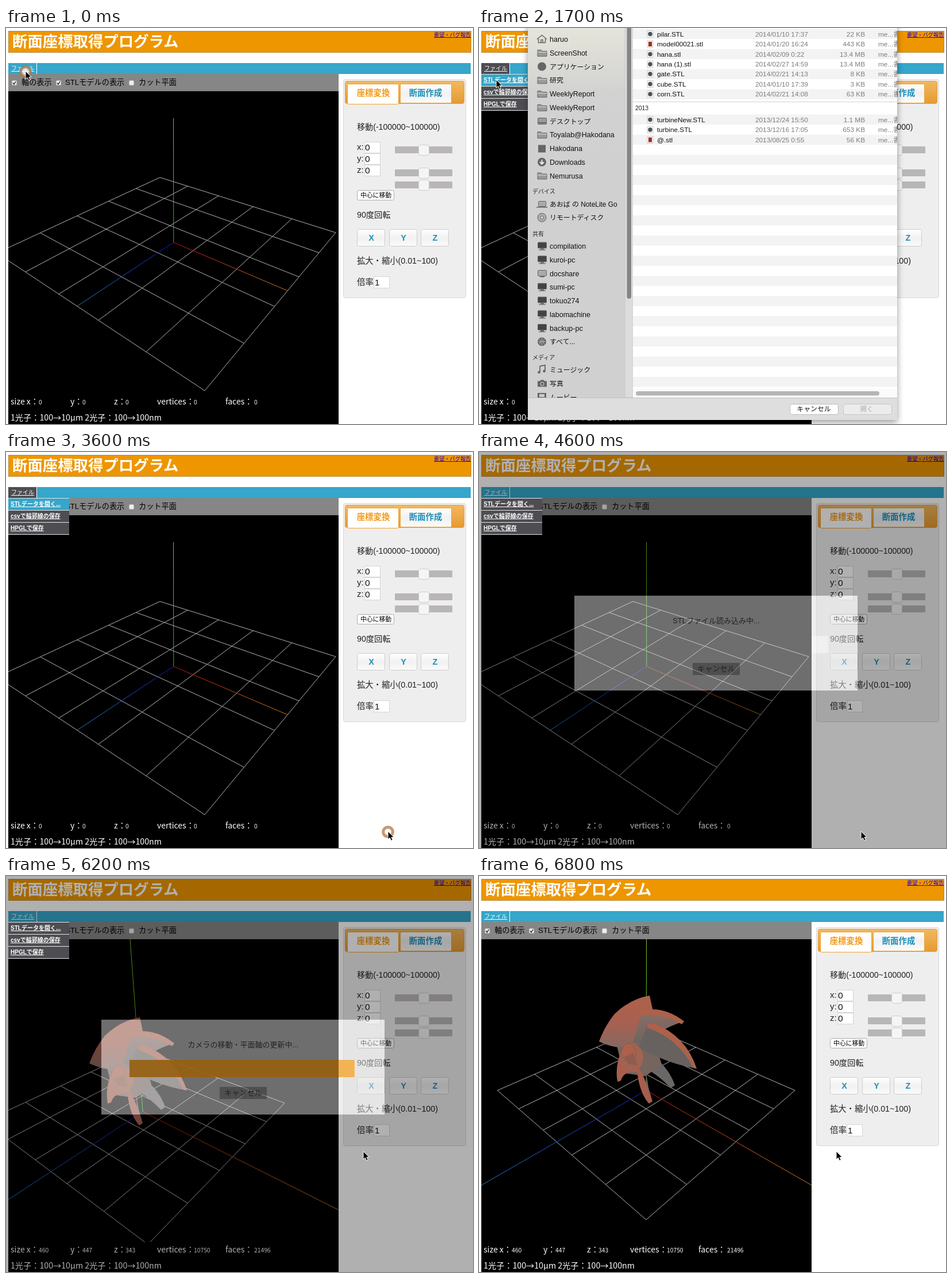
An HTML page that plays this animation: 813 px wide and 689 px high, repeating every 6.9 s.

```html
<!DOCTYPE html>
<html lang="ja">
<head>
<meta charset="utf-8">
<style>
html, body { margin: 0; width: 100%; height: 100%; overflow: hidden; background: #fff; }
svg { display: block; width: 813px; height: 689px; font-family: "Liberation Sans", "Noto Sans CJK JP", sans-serif; }
.wide { font-family: "Noto Sans CJK JP", "Noto Sans CJK", sans-serif; }
</style>
</head>
<body>
<svg id="stage" viewBox="0 0 813 689"></svg>
<script>
const LOOP = 6900;
const stage = document.getElementById('stage');

// Markup helpers
const rect = (x, y, w, h, fill, more = '') => `<rect x="${x}" y="${y}" width="${w}" height="${h}" fill="${fill}" ${more}/>`;
const box = (x, y, w, h, fill, stroke, r = 0) => rect(x + .5, y + .5, w, h, fill, `stroke="${stroke}" rx="${r}"`);
const text = (x, y, s, size, fill, more = '') => `<text x="${x}" y="${y}" font-size="${size}" fill="${fill}" ${more}>${s}</text>`;
const path = (d, fill, more = '') => `<path d="${d}" fill="${fill}" ${more}/>`;
const group = (id, body, more = '') => `<g id="${id}" ${more}>${body}</g>`;
const shade = (id, ...colors) => `<linearGradient id="${id}" x2="0" y2="1">` +
  colors.map((c, i) => `<stop offset="${i / (colors.length - 1)}" stop-color="${c}"/>`).join('') + '</linearGradient>';
const BOLD = ' font-weight="700"', LINK = ' text-decoration="underline"', MID = ' text-anchor="middle"', WIDE = ' class="wide"';

// Maps the unit square onto a quad given as top, right, bottom, left
function perspective([[x0, y0], [x1, y1], [x2, y2], [x3, y3]]) {
  const ax = x1 - x2, ay = y1 - y2, bx = x3 - x2, by = y3 - y2;
  const sx = x0 - x1 + x2 - x3, sy = y0 - y1 + y2 - y3;
  const den = ax * by - bx * ay, g = (sx * by - bx * sy) / den, h = (ax * sy - sx * ay) / den;
  return (u, v) => {
    const w = g * u + h * v + 1;
    return [((x1 - x0 + g * x1) * u + (x3 - x0 + h * x3) * v + x0) / w,
            ((y1 - y0 + g * y1) * u + (y3 - y0 + h * y3) * v + y0) / w];
  };
}

function axis(id, [x1, y1], [x2, y2], from, to) {
  const ends = `x1="${x1}" y1="${y1}" x2="${x2}" y2="${y2}"`;
  return `<linearGradient id="${id}" gradientUnits="userSpaceOnUse" ${ends}><stop stop-color="${from}"/>` +
    `<stop offset="1" stop-color="${to}"/></linearGradient><line ${ends} stroke="url(#${id})"/>`;
}

function scene(id, quad, xEnd, yEnd, zEnd, extra = '') {
  const at = perspective(quad), origin = at(.5, .5);
  let d = '';
  for (let i = 0; i <= 5; i++) d += `M${at(i / 5, 0)}L${at(i / 5, 1)}M${at(0, i / 5)}L${at(1, i / 5)}`;
  return group(id, path(d, 'none', 'stroke="#b2b2b2"') +
    axis(id + 'X', origin, xEnd, '#c01010', '#c07c20') +
    axis(id + 'Y', origin, yEnd, '#18c018', '#80c020') +
    axis(id + 'Z', origin, zEnd, '#1818c0', '#2080c8') + extra, 'clip-path="url(#view)"');
}

const turbine =
  path('M302 314C320 324 336 347 341 364L334 369C321 356 308 344 288 334Z', '#6c6767') +
  path('M264 290L298 250L326 262L310 300L318 328L290 348L252 343L240 296Z', '#76645e') +
  path('M209 288Q219 261 236 240Q263 214 297 208L302 231L292 284L264 297Q238 302 209 288Z', 'url(#blade)') +
  path('M284 234Q325 234 357 253Q319 264 288 291L268 290Z', 'url(#under)') +
  path('M280 235Q320 224 357 253L353 258Q322 239 278 242Z', '#ad614b') +
  path('M293 258Q350 272 379 335Q333 328 278 299Z', '#67625f') +
  path('M293 258L303 256Q360 277 379 335L373 334Q348 283 293 264Z', '#ad614b') +
  path('M249 301Q236 331 241 358L247 356Q252 338 276 341L283 306Z', '#a85f4c') +
  path('M276 330Q287 347 293 366L302 392L296 396Q281 380 276 346Z', '#a65e4d') +
  path('M290 336L295 368L302 392L292 366Z', '#746762') +
  '<ellipse cx="266" cy="316" rx="20" ry="24" fill="#a16352"/>' +
  path('M247 309Q252 287 265 292Q278 303 269 327Q253 323 247 309Z', '#ad614b', 'stroke="#855b52"') +
  path('M253 315L268 307L276 330L260 327Z', '#905c4f');

// Main page
const check = (x, on) => box(x, 91, 8, 8, '#eee', '#bbb', 1.5) +
  (on ? path(`M${x + 2} 95.5l2 2.5 3-5`, 'none', 'stroke="#222" stroke-width="1.4"') : '');
const slider = y => rect(677, y - 6, 100, 12, '#b9b6b7', 'rx="1"') + box(718, y - 9, 18, 18, '#f5f5f5', '#ccc', 3);
const field = (y, label) => text(611, y + 14, label, 15, '#222') + box(624, y, 27, 19, '#fff', '#d4d4d4') +
  text(625, y + 15, '0', 15.5, '#111');
const button = (x, s) => box(x, 350, 48, 29, 'url(#soft)', '#ccc', 3) + text(x + 25, 370, s, 14.4, '#1c8fb8', BOLD + MID);

const header = box(4, 5, 805, 37, '#ee9600', '#b38a45') +
  text(11, 33, '断面座標取得プログラム', 26.4, '#fff', BOLD) +
  text(745, 15, '要望・バグ報告', 9.2, '#2200c8', LINK) +
  rect(4, 61, 805, 19, '#36a6ca') + rect(4, 61, 49, 19, '#4e4d52', 'id="tab"') +
  text(9, 74, 'ファイル', 10, '#fff', LINK) + rect(53, 61, 1, 19, '#fff') +
  rect(4, 80, 575, 30, '#868686') + check(10, 1) + check(87, 1) + check(214, 0) +
  text(27, 99, '軸の表示', 13.2, '#000') + text(103, 99, 'STLモデルの表示', 13.2, '#000') +
  text(231, 99, 'カット平面', 13.2, '#000');

const panel = box(587, 89, 213, 380, '#eee', '#d8d8d8', 3) +
  box(590, 92, 207, 39, 'url(#amber)', '#e3a143', 3) +
  box(594, 97, 89, 35, '#fff', '#f2a02a', 2) + box(686, 97, 89, 33, 'url(#soft)', '#e8a63e', 2) +
  text(639.5, 118, '座標変換', 14.4, '#f09a1c', BOLD + MID) + text(730.5, 118, '断面作成', 14.4, '#1c8fb8', BOLD + MID) +
  text(611, 177, '移動(-100000~100000)', 14.1, '#222') +
  field(198, 'x:') + field(218, 'y:') + field(238, 'z:') + slider(212) + slider(252) + slider(273) +
  box(611, 282, 64, 17, '#fff', '#aaa', 3) + text(617, 295, '中心に移動', 10.8, '#000') +
  text(611, 330, '90度回転', 14.2, '#222') + button(611, 'X') + button(667, 'Y') + button(722, 'Z') +
  text(611, 410, '拡大・縮小(0.01~100)', 14.3, '#222') + text(611, 447, '倍率', 14.4, '#222') +
  box(640, 432, 27, 20, '#fff', '#d4d4d4') + text(642, 448, '1', 15, '#111');

const labels = [[8, 'size x：'], [112, 'y：'], [188, 'z：'], [263, 'vertices：'], [382, 'faces：']];
const valueX = [57, 133, 208, 327, 432];
const values = (id, list) => group(id, list.map((v, i) => text(valueX[i], 655, v, 10.3, '#fff', WIDE)).join(''));
const stats = labels.map(([x, s]) => text(x, 655, s, 14, '#fff', WIDE)).join('') +
  values('before', [0, 0, 0, 0, 0]) + values('after', [460, 447, 343, 10750, 21496]) +
  text(8, 683, '1光子：100→10μm 2光子：100→100nm', 14.2, '#fff', WIDE);

const views = rect(4, 110, 575, 579, '#000') +
  scene('start', [[268, 260], [574, 356], [346, 631], [-16, 391.5]], [490, 457], [291.5, 157], [124, 484]) +
  scene('moving', [[234, 301], [485, 395], [247, 641], [-38, 427]], [579, 581], [216, 110], [4, 563],
    `<g transform="translate(-64 38)">${turbine}</g>`) +
  scene('final', [[291, 260.5], [550, 373], [291, 598], [32, 373]], [579, 538], [291.5, 110], [4, 538], turbine);

const menu = group('menu', rect(4, 80, 106, 64, '#e4e4e4') + ['STLデータを開く...', 'csvで輪郭線の保存', 'HPGLで保存'].map((s, i) =>
  rect(4, 81 + i * 21, 106, 20, '#4e4d52', `id="item${i}"`) +
  text(8, 94 + i * 21, s, 10, '#fff', BOLD + LINK)).join(''));

// Progress dialog
const dim = group('dim', path('M0 0H813V689H0ZM166 250V415H659V250Z', '#000', 'opacity=".31"') +
  rect(166, 250, 493, 165, '#000', 'opacity=".12"'));
const progress = group('progress', rect(166, 250, 493, 165, '#fff', 'opacity=".43"') +
  rect(580, 320, 28, 30, '#fff', 'opacity=".4"') +
  rect(215, 320, 0, 30, '#965f0e', 'id="bar" opacity=".9"') +
  rect(579, 320, 0, 30, '#f3ad45', 'id="barTail" opacity=".9"') +
  rect(372, 367, 82, 21, '#000', 'opacity=".28"') + text(413, 382, 'キャンセル', 13.2, '#222', MID) +
  text(413, 298, '', 13, '#222', MID + ' id="message"'));

// File chooser
const INK = '#666';
const icons = {
  folder: y => path(`M102 ${y - 5}h6l2 2h8v9h-16z`, '#999', `stroke="${INK}"`) + path(`M102 ${y - 1}h16`, 'none', 'stroke="#ddd"'),
  home: y => path(`M101 ${y}l8.5-7 8.5 7M103.5 ${y - 1}v7h12v-7M108 ${y + 6}v-5h3v5`, 'none', `stroke="${INK}" stroke-width="1.5"`),
  dot: y => `<circle cx="109.5" cy="${y}" r="7.5" fill="${INK}"/>`,
  square: y => rect(103, y - 6, 13, 13, INK),
  desk: y => box(102, y - 6, 15, 11, '#999', INK, 1) + rect(103, y + 2, 14, 2, INK),
  laptop: y => box(103, y - 5, 13, 9, '#aaa', INK, 1) + rect(100, y + 5, 19, 1.5, INK),
  disc: y => `<circle cx="109.5" cy="${y}" r="7.5" fill="#aaa" stroke="${INK}"/><circle cx="109.5" cy="${y}" r="2.5" fill="#ddd" stroke="${INK}"/>`,
  down: y => icons.dot(y) + path(`M109.5 ${y - 4}v7m-3.5-3l3.5 3.5 3.5-3.5`, 'none', 'stroke="#eee" stroke-width="2"'),
  pc: y => box(102, y - 7, 15, 10, '#444', INK, 1) + rect(107, y + 4, 6, 2, INK) + rect(104, y + 6, 12, 1.2, INK),
  screen: y => box(102, y - 6, 15, 10, '#aaa', INK, 1) + rect(106, y + 5, 8, 1.5, INK),
  globe: y => icons.dot(y) + path(`M103 ${y}h13M109.5 ${y - 7}v14M105 ${y - 5}q4 5 0 10M114 ${y - 5}q-4 5 0 10`, 'none', 'stroke="#bbb"'),
  note: y => path(`M106 ${y + 4}v-10l9-2v10`, 'none', `stroke="${INK}" stroke-width="1.8"`) +
    `<circle cx="104.5" cy="${y + 4.5}" r="2.3" fill="${INK}"/><circle cx="113.5" cy="${y + 2.5}" r="2.3" fill="${INK}"/>`,
  camera: y => path(`M102 ${y - 4}h4l2-2h4l2 2h4v10h-16z`, INK) + `<circle cx="110" cy="${y + 1}" r="3" fill="${INK}" stroke="#ddd"/>`,
  film: y => rect(102, y - 7, 15, 14, INK) + rect(105, y - 5, 9, 5, '#ccc'),
};
const places = [
  [19.5, null, ['home', 'haruo'], ['folder', 'ScreenShot'], ['dot', 'アプリケーション'], ['folder', '研究'],
    ['folder', 'WeeklyReport'], ['folder', 'WeeklyReport'], ['desk', 'デスクトップ'], ['folder', 'Toyalab@Hakodana'],
    ['square', 'Hakodana'], ['down', 'Downloads'], ['folder', 'Nemurusa']],
  [306, 'デバイス', ['laptop', 'あおば の NoteLite Go'], ['disc', 'リモートディスク']],
  [379.5, '共有', ['pc', 'compilation'], ['pc', 'kuroi-pc'], ['screen', 'docshare'], ['pc', 'sumi-pc'],
    ['pc', 'tokuo274'], ['pc', 'labomachine'], ['pc', 'backup-pc'], ['globe', 'すべて...']],
  [594.5, 'メディア', ['note', 'ミュージック'], ['camera', '写真'], ['film', 'ムービー']],
];
const sidebar = places.map(([top, title, ...items]) =>
  (title ? text(93, top - 18, title, 10, '#222') : '') +
  items.map(([icon, name], i) => {
    const y = top + i * 23.75;
    return icons[icon](y) + text(123, y + 4.5, name, /^[\w@-]+$/.test(name) ? 12.5 : 11.9, '#111');
  }).join('')).join('');

const files = [
  [10.5, 'pilar.STL', '2014/01/10 17:37', '22 KB'], [28, 'model00021.stl', '2014/01/20 16:24', '443 KB', 1],
  [45.5, 'hana.stl', '2014/02/09 0:22', '13.4 MB'], [63, 'hana (1).stl', '2014/02/27 14:59', '13.4 MB'],
  [80, 'gate.STL', '2014/02/21 14:13', '8 KB'], [97.5, 'cube.STL', '2014/01/10 17:39', '3 KB'],
  [115, 'corn.STL', '2014/02/21 14:08', '63 KB'], [159.5, 'turbineNew.STL', '2013/12/24 15:50', '1.1 MB'],
  [177, 'turbine.STL', '2013/12/16 17:05', '653 KB'], [194.5, '@.stl', '2013/08/25 0:55', '56 KB', 1],
];
function fileRow([y, name, date, size, red], chosen) {
  const ink = chosen ? '#fff' : '#111', grey = chosen ? '#fff' : '#7c7c7c', weight = chosen ? BOLD : '';
  return (chosen ? rect(268, y - 9, 460, 17.5, '#7b1a15') : '') +
    rect(293, y - 6, 10, 12, '#f4f4f4', 'stroke="#bbb" stroke-width=".7"') +
    (red ? rect(295, y - 4, 6, 8, '#a52a20') : `<circle cx="298" cy="${y}" r="3.7" fill="#4b5054"/>`) +
    text(310, y + 4, name, 11.8, ink, weight) + text(481, y + 4, date, 11.8, grey, weight) +
    text(672, y + 4, size, 11.8, grey, weight + ' text-anchor="end"') +
    text(695, y + 4, 'me...書類', 11.8, grey, weight + ' clip-path="url(#list)"');
}
let stripes = '';
for (const y of [1.5, 36.5, 71.5, 106.5]) stripes += rect(268, y, 460, 17.5, '#f3f3f3');
for (let y = 150.5; y < 625; y += 35.1) stripes += rect(268, y, 460, 17.5, '#f3f3f3');

const chooser = group('chooser',
  rect(85, -20, 643, 702, '#dedede', 'filter="url(#shadow)"') + rect(85, -20, 169, 663, 'url(#side)') +
  rect(254, -20, 14, 663, '#dcdcdc', 'stroke="#c4c4c4" stroke-width=".8"') + rect(257.5, -20, 7.5, 491, '#858585', 'rx="3.7"') +
  rect(268, -20, 460, 663, '#fff') + stripes +
  rect(268, 128, 460, 1, '#d0d0d0') + text(272, 143, '2013', 10.4, '#222') + files.map(f => fileRow(f)).join('') +
  group('chosen', fileRow(files[7], true)) +
  rect(268, 628, 460, 15, '#fafafa') + rect(273, 632, 424, 7.5, '#b5b5b5', 'rx="3.7"') +
  `<g clip-path="url(#sidebar)">${sidebar}</g>` + rect(85, 643, 643, 39, '#dedede') + rect(85, 643, 643, 1, '#c2c2c2') +
  box(541, 654, 84, 18, '#fff', '#bcbcbc', 3.5) + text(583, 667, 'キャンセル', 11.9, '#111', MID) +
  box(634, 654, 84, 18, '#ececec', '#c8c8c8', 3.5) + text(675, 667, '開く', 11.5, '#aaa', MID) +
  group('ready', box(634, 654, 84, 18, 'url(#blue)', '#2587a8', 3.5) + text(675, 667, '開く', 11.5, '#fff', MID)));

const pointer = group('pointer',
  '<circle id="ring" cy="1" r="8.3" fill="#fff" fill-opacity=".75" stroke="#b4713c" stroke-opacity=".72" stroke-width="5"/>' +
  path('M0 0V14.2L3.3 11.2L5.6 16.3L8.2 15.2L5.9 10.2H10.2Z', '#000', 'stroke="#fff"'));

stage.innerHTML = '<defs>' + shade('soft', '#fff', '#f1f1f1', '#fbfbfb') + shade('amber', '#f3b85f', '#e59a31') +
  shade('blade', '#ae614b', '#a86050', '#866861') + shade('under', '#8c6c64', '#6d6562') +
  shade('side', '#e9e8dc', '#d2d2d2', '#d0d0d0', '#d0d0d0', '#d0d0d0', '#d0d0d0') + shade('blue', '#4db3d2', '#2592b8') +
  '<clipPath id="view"><rect x="4" y="110" width="575" height="527"/></clipPath>' +
  '<clipPath id="list"><rect x="268" y="-20" width="460" height="663"/></clipPath>' +
  '<clipPath id="sidebar"><rect x="85" y="-20" width="169" height="663"/></clipPath>' +
  '<filter id="shadow" x="-10%" width="120%" y="-10%" height="120%"><feDropShadow dx="0" dy="4" stdDeviation="6" flood-opacity=".4"/></filter></defs>' +
  rect(0, 0, 813, 689, '#fff') + header + panel + views + stats + dim + menu + progress + chooser + pointer;

const part = id => document.getElementById(id);
const show = (id, on) => part(id).setAttribute('visibility', on ? 'visible' : 'hidden');
const set = (id, name, value) => part(id).setAttribute(name, value);
const ramp = (t, a, b) => Math.min(1, Math.max(0, (t - a) / (b - a)));
const ease = k => k * k * (3 - 2 * k);
const during = (t, a, b) => t >= a && t < b;

const route = [[0, 34, 75], [450, 34, 75], [850, 30, 90], [1750, 30, 90], [2150, 345, 158], [2450, 345, 158],
  [2900, 671, 548], [3200, 665, 660], [4700, 665, 660], [5400, 622, 479], [LOOP, 622, 479]];
const clicks = [[0, 200], [1050, 1300], [2200, 2400], [3350, 3680]];

function draw(t) {
  const loaded = t >= 5800, done = t >= 6500;
  const menuOpen = during(t, 300, 6500), busy = during(t, 3700, 6500);

  show('start', !loaded);
  show('moving', loaded && !done);
  show('final', done);
  show('before', !loaded);
  show('after', loaded);

  show('menu', menuOpen);
  show('tab', during(t, 300, 3700));
  set('item0', 'fill', during(t, 800, 3700) ? '#36a6ca' : '#4e4d52');

  const fade = busy ? ramp(t, 3650, 3900) : 0;
  set('dim', 'opacity', fade);
  set('progress', 'opacity', fade);
  const width = 392 * ramp(t, 4700, 5700);
  set('bar', 'width', Math.min(width, 364));
  set('barTail', 'width', Math.max(0, width - 364));
  part('message').textContent = loaded ? 'カメラの移動・平面軸の更新中...' : 'STLファイル読み込み中...';

  const open = ease(ramp(t, 1400, 1680)) * (1 - ease(ramp(t, 3450, 3600)));
  set('chooser', 'transform', `translate(0 ${-710 * (1 - open)})`);
  show('chooser', open > 0);
  show('chosen', open > 0 && t >= 2250);
  show('ready', open > 0 && t >= 2250);

  const i = route.findIndex(p => p[0] > t), [t0, x0, y0] = route[i - 1], [t1, x1, y1] = route[i];
  const k = ease(ramp(t, t0, t1));
  set('pointer', 'transform', `translate(${x0 + (x1 - x0) * k} ${y0 + (y1 - y0) * k})`);
  show('ring', clicks.some(([a, b]) => during(t, a, b)));
}

const began = performance.now();
function tick() {
  draw((performance.now() - began) % LOOP);
  requestAnimationFrame(tick);
}
tick();
</script>
</body>
</html>
```
